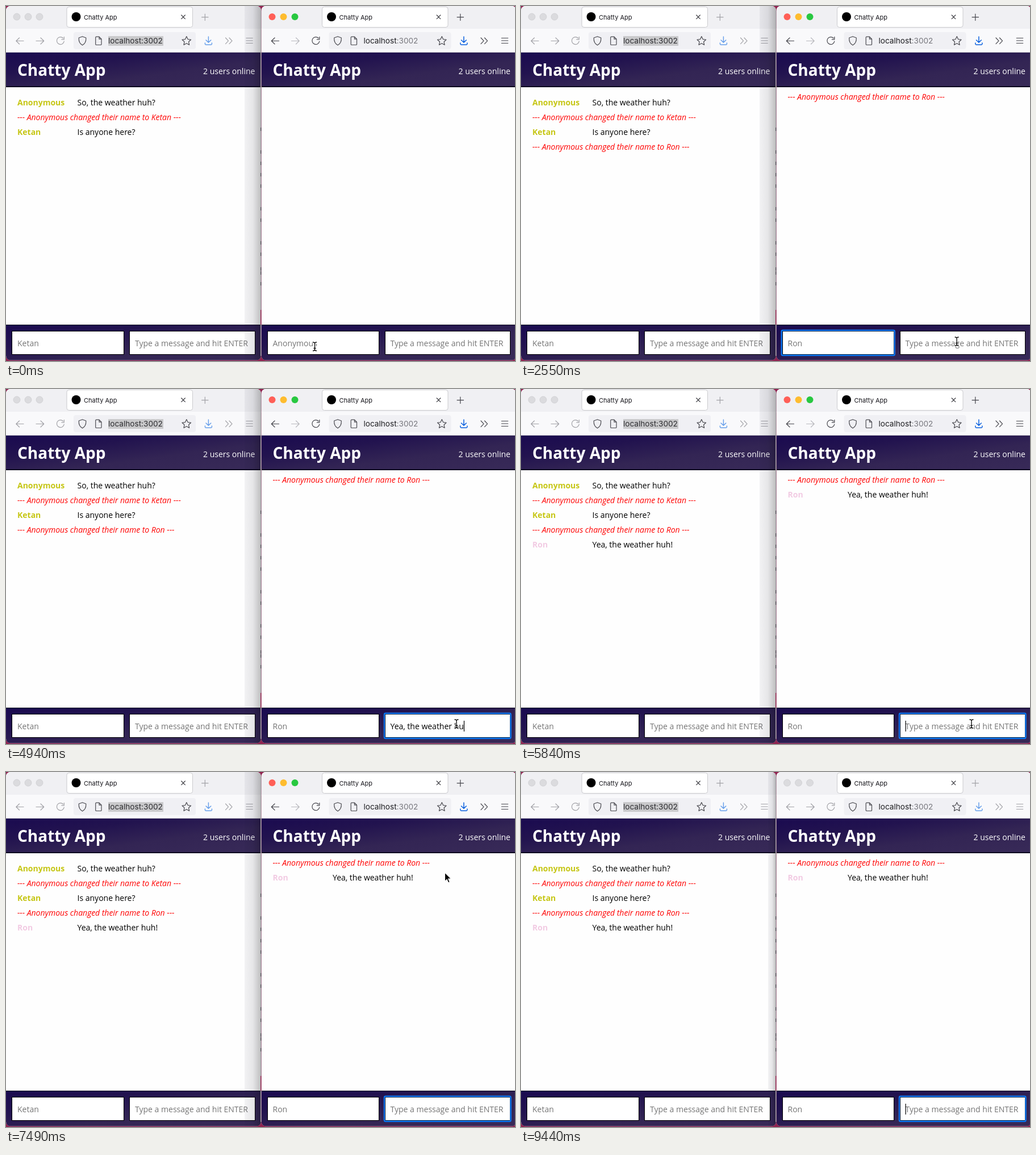
Write an HTML page that moves like this. It is 896x625 px and loops after 9.54 s.

```html
<!DOCTYPE html>
<html lang="en">
<head>
<meta charset="utf-8">
<title>Chatty App</title>
<style>
  html, body { margin: 0; width: 100%; height: 100%; overflow: hidden; background: #8f2350; }
  svg { display: block; width: 100%; height: 100%; }
  text { white-space: pre; font: 14px "Open Sans", "Noto Sans", sans-serif; }
  .ui { font-family: Inter, Roboto, sans-serif; }
  .bold { font-weight: 700; }
  .note { font-style: italic; fill: #f00; }
  .line { fill: none; stroke-linecap: round; stroke-linejoin: round; stroke-width: 1.2; }
  .crisp { shape-rendering: crispEdges; }
</style>
</head>
<body>
<svg id="stage" viewBox="0 0 896 625" xmlns="http://www.w3.org/2000/svg"></svg>
<script>
const LOOP = 9540;
const RIGHT = 449.5;
const NAME_X = 20, MSG_X = 227;
const GUEST = 'Ron', HOST = 'Ketan';
const REPLY = 'Yea, the weather huh!';
const PROMPT = 'Type a message and hit ENTER';
const GREY = '#757575';

// [first, last, steps] of each run of picture changes
const runs = [
  [0, 150, 2], [450, 600, 2], [1050, 1050, 1], [1350, 1650, 3], [1950, 2850, 7],
  [3150, 4190, 8], [4340, 5240, 7], [5540, 5540, 1], [5840, 5840, 1],
  [6140, 7040, 7], [7190, 8090, 7], [8240, 8540, 3], [8840, 9140, 3], [9440, 9440, 1]
];
const ticks = runs.flatMap(([a, b, n]) =>
  Array.from({ length: n }, (_, i) => n > 1 ? Math.round(a + (b - a) * i / (n - 1)) : a));

// [time, x, y] of the pointer
const path = [
  [1950, 543.5, 599.5], [2700, 793, 589.5], [5990, 793, 589.5], [6440, 860, 470],
  [6740, 850, 300], [7040, 815, 220], [7490, 772.5, 177], [8090, 776, 210],
  [8540, 780, 433], [8840, 852, 530], [9140, 845, 640]
];
const caretToggles = [150, 600, 1050, 1650, 2850, 3150, 3450, 5540];
const BLINK = 1066;

const line = (d, stroke, extra = '') => `<path class="line" d="${d}" stroke="${stroke}" ${extra}/>`;
const rect = (x, y, w, h, fill, extra = '') =>
  `<rect x="${x}" y="${y}" width="${w}" height="${h}" fill="${fill}" ${extra}/>`;
const label = (x, y, s, fill, cls = '', extra = '') =>
  `<text x="${x}" y="${y}" fill="${fill}" class="${cls}" ${extra}>${s}</text>`;

function lights(colours, stroke) {
  return colours.map((c, i) =>
    `<circle cx="${19 + 20 * i}" cy="19" r="6" fill="${c}" stroke="${stroke}" stroke-width=".6"/>`).join('');
}

function starPath(cx, cy, r) {
  return 'M' + Array.from({ length: 10 }, (_, i) => {
    const a = i * Math.PI / 5 - Math.PI / 2, k = i % 2 ? r * 0.48 : r;
    return `${(cx + k * Math.cos(a)).toFixed(2)} ${(cy + k * Math.sin(a)).toFixed(2)}`;
  }).join('L') + 'Z';
}

function buttons(active) {
  const ink = active ? '#45454c' : '#a2a2a7';
  const faint = active ? '#b9b9be' : '#a2a2a7';
  const blue = active ? '#0a60df' : '#69a0ea';
  return lights(active ? ['#ff5f57', '#febc2e', '#28c840'] : Array(3).fill('#dbdbde'), active ? 'none' : '#c6c6ca')
    + line('M350.3 14v11.4M344.6 19.7h11.4', ink)
    + line('M31 61.5H18M23.5 56l-5.7 5.5 5.7 5.5', ink)
    + line('M53 61.5h13.5M61 56l5.7 5.5-5.7 5.5', faint)
    + line('M100.5 56.5a6.5 6.5 0 1 0 1.8 5.5M102.3 54.3v4.5h-4.5', ink)
    + line('M356.4 54v10M352 60l4.4 4.3 4.4-4.3M350.4 65v1.6q0 1.6 1.6 1.6h8.8q1.6 0 1.6-1.6V65', blue, 'style="stroke-width:1.5"')
    + line('M386.5 56l5 5.3-5 5.3M393 56l5 5.3-5 5.3', ink)
    + line('M422.8 56.5h11.4M422.8 61h11.4M422.8 65.5h11.4', ink);
}

function frameBar(y, h) {
  return rect(0, y, 450, h, 'url(#bar)');
}

function chrome(selected) {
  const url = selected
    ? rect(180, 53, 97, 17, '#c9c9cb') + label(180, 66, 'localhost:3002', '#2c2c30', 'ui', 'style="font-size:13.6px"')
    : label(180, 66, 'localhost<tspan fill="#77777d">:3002</tspan>', '#1c1c20', 'ui', 'style="font-size:13.6px"');
  return rect(0, 0, 450, 625, '#fefefe')
    + rect(0, 0, 450, 41, '#f0f0f3')
    + rect(0, 40, 450, 41, '#f9f9fb')
    + rect(0, 81, 450, 1, '#c9c9cf', 'class="crisp"')
    + rect(107, 1.5, 221.5, 36, '#fff', 'rx="4" stroke="#c4c4c9" stroke-width=".9"')
    + '<circle cx="123.5" cy="19" r="8" fill="#000"/>'
    + label(137, 24, 'Chatty App', '#15141a', 'ui', 'style="font-size:11px"')
    + line('M308.7 16l6.6 6.6M315.3 16l-6.6 6.6', '#3c3c42')
    + rect(119, 46, 215, 30, '#f0f0f4', 'rx="4"')
    + line('M134.5 53.7l6.3 2.3c.3 5.6-1 10.2-6.3 13-5.300-2.800-6.600-7.400-6.300-13Z', '#4a4a50')
    + line('M157.700 55.500q0-1.300 1.300-1.300h5l4 4v9q0 1.300-1.300 1.300h-7.700q-1.300 0-1.300-1.300ZM164 54.200v4h4', '#4a4a50')
    + url
    + line(starPath(317.8, 61.8, 8.2), '#4a4a50')
    + frameBar(82, 60)
    + rect(0, 141, 450, 2, '#0d0820', 'class="crisp"')
    + label(20, 122.5, 'Chatty App', '#fff', 'bold', 'style="font-size:28px"')
    + label(347, 120, '2 users online', '#fff')
    + frameBar(561, 64)
    + rect(0, 561, 450, 1, '#08041a', 'class="crisp"')
    + field(10.5, 196.5) + field(217.5, 220.5);
}

const field = (x, w) => rect(x, 572.5, w, 41, '#fff', 'stroke="#000" class="crisp"');

const renamed = (x, y, who) => label(x, y, `--- Anonymous changed their name to ${who} ---`, '#f00', 'note');
const said = (y, who, colour, s) => label(20, y, who, colour, 'bold') + label(125.5, y, s, '#000');

const OLIVE = '#c6c615', PINK = '#f2cbe3';
const reply = y => said(y, GUEST, PINK, REPLY);
const shade = (id, x) => `<linearGradient id="${id}" gradientUnits="userSpaceOnUse" x1="${x}" x2="449" y1="0" y2="0">
  <stop offset="0" stop-color="#101030" stop-opacity=".05"/>
  <stop offset=".5" stop-color="#101020" stop-opacity=".1"/>
  <stop offset="1" stop-color="#000" stop-opacity=".26"/></linearGradient>`;

function desktopSliver() {
  const specks = [217, 257, 277, 297, 317, 357, 377, 417, 437, 463, 470, 489];
  return rect(448, 8, 1.500, 608, '#a3a3a8')
    + rect(448, 535, 1.5, 26, '#96224f')
    + specks.map(y => rect(448, y - 3, 1.500, 6, '#55555c')).join('');
}

const stage = document.getElementById('stage');
stage.innerHTML = `
<defs>
  <linearGradient id="bar" x1="0" y1="0" x2="1" y2="1">
    <stop offset="0" stop-color="#1a0a50"/><stop offset=".3" stop-color="#22134f"/>
    <stop offset=".62" stop-color="#332554"/><stop offset="1" stop-color="#382a58"/>
  </linearGradient>
  ${shade('deep', 420)}${shade('slim', 435)}
  <clipPath id="win"><rect x="0" y="0" width="449" height="623.5" rx="8"/></clipPath>
</defs>
<g clip-path="url(#win)">
  ${chrome(true)}${buttons(false)}
  ${said(175, 'Anonymous', OLIVE, 'So, the weather huh?')}
  ${renamed(20, 201, HOST)}
  ${said(227, HOST, OLIVE, 'Is anyone here?')}
  <g class="renamed">${renamed(20, 253, GUEST)}</g>
  <g class="reply">${reply(279)}</g>
  ${label(NAME_X, 598.5, HOST, GREY)}${label(MSG_X, 598.5, PROMPT, GREY)}
  <rect id="deepShade" x="420" y="0" width="29" height="625" fill="url(#deep)"/>
  <rect id="slimShade" x="435" y="0" width="14" height="625" fill="url(#slim)"/>
</g>
${desktopSliver()}
<g transform="translate(${RIGHT})">
  <g clip-path="url(#win)">
    ${chrome(false)}
    <g id="awake">${buttons(true)}</g><g id="asleep">${buttons(false)}</g>
    <g class="renamed">${renamed(20, 165, GUEST)}</g>
    <g class="reply">${reply(191)}</g>
    <rect id="ring" y="571" height="44" rx="2" fill="none" stroke="#0a78f5" stroke-width="2.4"/>
    ${label(NAME_X, 598.5, '', GREY, '', 'id="name"')}
    ${label(MSG_X, 598.5, '', GREY, '', 'id="msg"')}
    <rect id="caret" y="584" width="1.2" height="19" fill="#000"/>
  </g>
</g>
<g id="beam" fill="none" stroke-linecap="round">
  <path d="M-3-7.500q3 0 3 2v11q0 2 3 2M3-7.500q-3 0-3 2v11q0 2-3 2M-1.500 3h3" stroke="#fff" stroke-width="3"/>
  <path d="M-3-7.500q3 0 3 2v11q0 2 3 2M3-7.500q-3 0-3 2v11q0 2-3 2M-1.500 3h3" stroke="#000" stroke-width="1.3"/>
</g>
<path id="arrow" d="M0 0v15.500l3.600-3.400 2.500 5.800 2.600-1.100-2.500-5.700h5Z" fill="#000" stroke="#fff" stroke-width="1.1"/>`;

const el = id => document.getElementById(id);
const show = (node, on) => node.setAttribute('visibility', on ? 'visible' : 'hidden');
const showAll = (cls, on) => stage.querySelectorAll('.' + cls).forEach(n => n.tagName === 'g' && show(n, on));

function pointer(t) {
  if (t <= path[0][0]) return path[0].slice(1);
  const i = path.findIndex(p => p[0] >= t);
  if (i < 0) return path[path.length - 1].slice(1);
  const [a, b] = [path[i - 1], path[i]];
  const u = (t - a[0]) / (b[0] - a[0]), k = u * u * (3 - 2 * u);
  return [a[1] + (b[1] - a[1]) * k, a[2] + (b[2] - a[2]) * k];
}

function typedName(t) {
  if (t < 450 || t >= 1950) return '';
  return GUEST.slice(0, t < 1050 ? 1 : t < 1350 ? 2 : 3);
}

function typedReply(t) {
  if (t < 3300 || t >= 5840) return '';
  if (t >= 4940) return REPLY.slice(0, t < 5090 ? 19 : t < 5240 ? 20 : 21);
  return REPLY.slice(0, 1 + Math.floor((t - 3300) / 1640 * 18));
}

function fill(node, value, hint) {
  node.textContent = value || hint;
  node.setAttribute('fill', value ? '#000' : GREY);
  return value ? node.getComputedTextLength() : 0;
}

function caretOn(t) {
  if (t >= 5840) return (t - 5840) % BLINK < BLINK / 2;
  return caretToggles.filter(k => k <= t).length % 2 === 1;
}

function draw(t) {
  const inMsg = t >= 2850, awake = t < 9440;
  const nameEnd = NAME_X + fill(el('name'), typedName(t), t < 1950 ? 'Anonymous' : GUEST);
  const msgEnd = MSG_X + fill(el('msg'), typedReply(t), PROMPT);

  showAll('renamed', t >= 1950);
  showAll('reply', t >= 5840);
  show(el('awake'), awake);
  show(el('asleep'), !awake);
  show(el('deepShade'), awake);
  show(el('slimShade'), !awake);

  show(el('ring'), t >= 150);
  el('ring').setAttribute('x', inMsg ? 216.5 : 9.2);
  el('ring').setAttribute('width', inMsg ? 222.5 : 199);
  show(el('caret'), caretOn(t));
  el('caret').setAttribute('x', inMsg ? msgEnd : nameEnd);

  const [x, y] = pointer(t);
  const overField = y > 572 && y < 614 && ((x > 460 && x < 657) || (x > 667 && x < 888));
  const at = `translate(${x.toFixed(1)} ${y.toFixed(1)})`;
  el('beam').setAttribute('transform', at);
  el('arrow').setAttribute('transform', at);
  show(el('beam'), overField);
  show(el('arrow'), !overField);
}

const start = performance.now();
let last = -1;
function loop() {
  const now = (performance.now() - start) % LOOP;
  const t = ticks.filter(k => k <= now).pop() || 0;
  if (t !== last) draw(last = t);
  requestAnimationFrame(loop);
}
loop();
</script>
</body>
</html>
```
